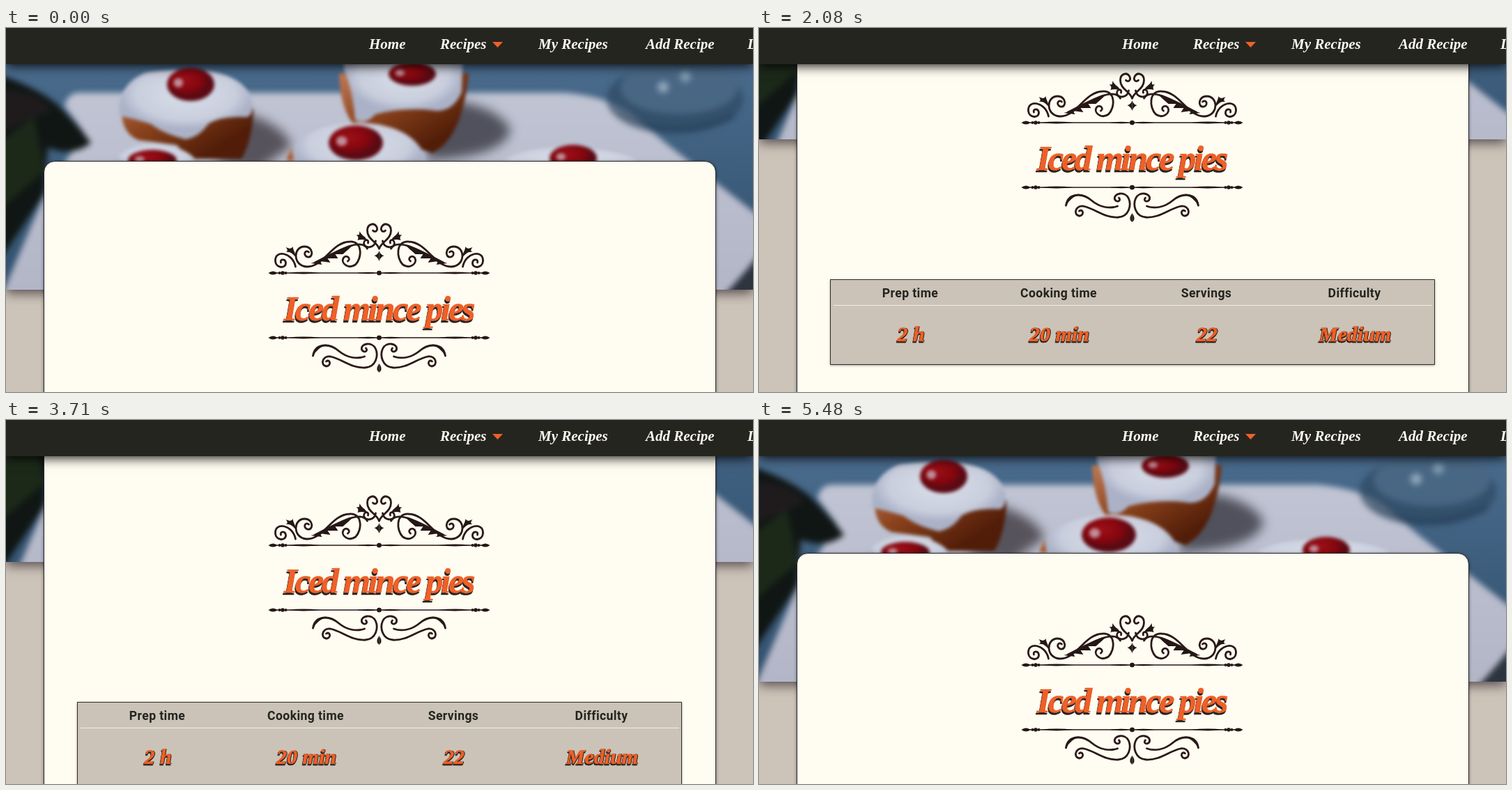
Recreate the animation shown at these times as an HTML page. Size 1072x523 px, loop 6330 ms.

```html
<!DOCTYPE html>
<html lang="en">
<head>
<meta charset="utf-8">
<title>Iced mince pies</title>
<style>
html, body { margin: 0; width: 100%; height: 100%; overflow: hidden; background: #cdc4b9; }
svg { position: absolute; left: 0; top: 0; display: block; overflow: visible; }
#stage { position: relative; width: 1072px; height: 523px; overflow: hidden; background: #cdc4b9; }
#page { position: absolute; left: 0; top: 0; width: 1072px; height: 1000px; }
#hero { position: absolute; width: 1072px; height: 376px; box-shadow: 0 5px 16px rgba(45, 34, 40, .75); }
#clip { position: absolute; width: 100%; height: 100%; overflow: hidden; background: #40607f; }
#card { position: absolute; left: 54px; top: 191px; width: 963px; height: 900px; border: 1px solid #292823;
  border-radius: 16px; background: #fffcf1; box-shadow: 0 1px 4px rgba(0, 0, 0, .5); }
#facts { position: absolute; left: 102px; top: 577px; width: 866px; height: 121px; border: 1px solid #302f2a;
  background: #cbc3b7; box-shadow: 0 1px 3px rgba(0, 0, 0, .35); }
#facts::after { content: ""; position: absolute; left: 4px; right: 3px; top: 36px; height: 1px; background: #f2eee3; }
#nav { position: absolute; width: 1072px; height: 52px; background: #252520; box-shadow: 0 2px 16px rgba(0, 0, 0, .95); }
.script { font: italic 700 21px "Liberation Serif", serif; fill: #fffcf1; }
.script.title { font-size: 50px; letter-spacing: -3.2px; }
.script.value { font-size: 30px; }
.title, .value { fill: #ee6028; stroke: #ee6028; stroke-width: .7px; text-anchor: middle; }
.title { filter: drop-shadow(-1px 3px 0 #25221f); }
.value { filter: drop-shadow(1px 0 0 #25221f) drop-shadow(-1px 2px 0 #25221f); }
.label { font: 700 17.6px Roboto, sans-serif; letter-spacing: .4px; fill: #242420; text-anchor: middle; }
.line { fill: none; stroke: #2a1a18; stroke-width: 2.8; stroke-linecap: round; }
.solid { fill: #241715; }
</style>
</head>
<body>
<div id="stage">
  <div id="page">
    <div id="hero"><div id="clip">
      <svg id="photo" width="1072" height="460">
        <defs>
          <linearGradient id="sky" x2="0" y2="1">
            <stop offset=".1" stop-color="#4c6e90"/><stop offset=".5" stop-color="#3c5c7b"/><stop offset="1" stop-color="#2c4964"/>
          </linearGradient>
          <linearGradient id="cloth" x2="0" y2="1">
            <stop stop-color="#c0c4d3"/><stop offset="1" stop-color="#aeb1c3"/>
          </linearGradient>
          <linearGradient id="cake" x2=".8" y2=".8">
            <stop stop-color="#c17a55"/><stop offset=".5" stop-color="#8a421c"/><stop offset="1" stop-color="#511d08"/>
          </linearGradient>
          <radialGradient id="ice" cy=".35">
            <stop stop-color="#d9deea"/><stop offset=".75" stop-color="#c9cedd"/><stop offset="1" stop-color="#abb2c7"/>
          </radialGradient>
          <radialGradient id="red" cx=".4" cy=".35">
            <stop stop-color="#9c0f18"/><stop offset=".65" stop-color="#85060e"/><stop offset="1" stop-color="#5a0a14"/>
          </radialGradient>
        </defs>
        <rect x="-30" y="-30" width="1132" height="520" fill="url(#sky)"/>
        <g style="filter:blur(4px)">
          <path d="M104 93H800Q866 98 900 126L950 168L1090 278V480H-30V440L55 240L112 150L84 112Q88 94 104 93Z" fill="url(#cloth)"/>
          <path d="M1090 312Q1066 346 1030 384H1090Z" fill="#2c343e"/>
          <path d="M-20 64Q40 82 74 110Q104 140 122 165Q96 186 60 172L54 240L-20 350Z" fill="#101614"/>
          <path d="M-10 165L40 128L56 205L-10 262Z" fill="#1c2919"/>
          <path d="M-10 88Q45 90 66 118L-10 150Z" fill="#1f1b1d"/>
          <g opacity=".65">
            <ellipse cx="960" cy="102" rx="98" ry="50" fill="#2b465f"/>
            <ellipse cx="966" cy="86" rx="84" ry="38" fill="#4a6782"/>
            <path d="M880 122Q950 168 1045 126" fill="none" stroke="#1c344b" stroke-width="7"/>
            <circle cx="943" cy="85" r="8" fill="#b9cad8"/><circle cx="975" cy="70" r="8" fill="#9db5c8"/>
          </g>
        </g>
        <g style="filter:blur(8px)">
          <path d="M335 120Q400 138 410 170L360 205L300 190Z" fill="#57535c"/>
          <path d="M640 104Q708 114 724 146Q716 186 600 190Z" fill="#50515c"/>
        </g>
        <g id="cakes" style="filter:blur(2.5px)">
          <path d="M166 124Q168 152 190 161L245 168L262 188H338Q354 160 355 116L260 70Z" fill="url(#cake)"/>
          <path d="M163 126Q158 82 200 64Q320 48 348 92Q360 122 346 128Q308 126 290 138Q278 156 258 160Q226 152 208 138Q190 132 163 126Z" fill="url(#ice)"/>
          <path d="M478 65Q480 120 502 142L528 150L612 180Q655 158 664 65Z" fill="url(#cake)"/>
          <path d="M485 60Q498 90 501 132Q516 140 530 124Q570 114 610 118Q640 124 654 92L656 30H485Z" fill="url(#ice)"/>
          <path d="M402 190L410 172Q430 176 440 195Z" fill="#a85a31"/>
          <path d="M410 176Q430 138 505 136Q582 138 602 185L590 225H420Z" fill="url(#ice)"/>
          <path d="M150 210Q154 168 215 166Q275 172 282 210Z" fill="url(#ice)"/>
          <path d="M690 210Q724 168 812 172Q910 176 930 210Z" fill="url(#ice)"/>
        </g>
      </svg>
    </div></div>
    <div id="card"></div>
    <div id="facts"></div>
    <svg id="art" width="1072" height="800">
      <defs>
        <g id="rule">
          <path class="line" d="M0 0H150" style="stroke-width:1.5"/>
          <path class="solid" d="M4 0Q14 -2.5 32 0Q14 2.5 4 0ZM84 0Q110 -2.8 131 0Q110 2.8 84 0ZM146 0Q152 -5 159 0Q152 5 146 0Z"/>
          <circle class="solid" r="3.2"/><circle class="solid" cx="134" r="2"/>
          <circle class="solid" cx="138.5" r="2.8"/><circle class="solid" cx="143" r="2"/>
        </g>
        <g id="half">
          <use href="#rule" y="352"/>
          <use href="#rule" y="445"/>
          <g class="line">
            <path d="M0 317C4 306 17 304 17 291C17 282 8 279 4 285C1 290 5 295 9 291"/>
            <path d="M5 306C7 317 20 317 22 310C22 303 14 303 16 309"/>
            <path d="M101 322C106 318 110 326 103 329C94 331 94 314 107 314C124 314 124 342 104 343C80 344 68 307 42 307C24 306 24 330 34 340C44 347 56 338 51 330C46 325 40 332 45 335"/>
            <path d="M17 317C26 302 52 316 92 337"/>
            <path d="M120 343C124 322 150 318 149 335C148 346 133 346 134 337C135 331 143 332 141 337"/>
            <path d="M95 471C92 453 72 452 58 464C46 474 32 476 21 472"/>
            <path d="M76 479C71 475 68 484 75 486C85 486 82 470 70 472C52 476 40 489 20 488C4 487 1 470 5 461C10 450 27 453 25 462C22 468 15 464 19 460"/>
          </g>
          <g class="solid">
            <path d="M17 306C20 298 24 300 28 292C29 296 27 298 33 297C29 300 30 302 31 305C25 303 21 304 17 306Z"/>
            <path d="M36 311C60 316 70 330 98 338L82 340L85 335L70 337L74 331L59 331L63 325L52 325C45 319 41 315 36 311Z"/>
            <path d="M120 329C120 322 123 321 124 314C126 317 127 318 134 315C131 319 131 320 134 322C127 321 124 325 120 329Z"/>
            <path d="M0 320Q2 326 7 327Q2 329 0 335Z"/>
            <path d="M0 482Q5 489 2 493L0 495Z"/>
            <path d="M95 472Q90 453 74 455Q89 459 95 472Z"/>
          </g>
        </g>
      </defs>
      <use href="#half" transform="translate(535.5)"/>
      <use href="#half" transform="translate(535.5) scale(-1 1)"/>
      <text class="script title" x="534.5" y="420">Iced mince pies</text>
    </svg>
  </div>
  <div id="nav">
    <svg id="menu" width="1072" height="52"><path d="M698 20H713L705.5 28Z" fill="#ee6028"/></svg>
  </div>
  <svg id="cursor" width="12" height="20">
    <path d="M.5 .5V13.5L3.6 10.8L5.7 15.6L7.8 14.7L5.8 10H9.7Z" fill="#fff" stroke="#222"/>
  </svg>
</div>
<script>
const LOOP = 6330, LEAD = 4;
const $ = id => document.getElementById(id);

function add(parent, tag, attrs, text = "") {
  const el = document.createElementNS("http://www.w3.org/2000/svg", tag);
  for (const k in attrs) el.setAttribute(k, attrs[k]);
  el.textContent = text;
  parent.append(el);
}

[["Home", 521], ["Recipes", 623], ["My Recipes", 764], ["Add Recipe", 918], ["Login", 1064]]
  .forEach(([name, x]) => add($("menu"), "text", { class: "script", x, y: 30 }, name));

[["Prep time", "2 h", 217], ["Cooking time", "20 min", 430], ["Servings", "22", 642], ["Difficulty", "Medium", 854.5]]
  .forEach(([name, value, x]) => {
    add($("art"), "text", { class: "label", x, y: 603 }, name);
    add($("art"), "text", { class: "script value", x: x + 1, y: 666 }, value);
  });

// cherries: centre and radii, each with a soft highlight
[[265, 81, 34, 24], [583, 66, 34, 17], [502, 165, 39, 25], [210, 190, 35, 15], [814, 187, 34, 19]]
  .forEach(([cx, cy, rx, ry]) => {
    add($("cakes"), "ellipse", { cx, cy, rx, ry, fill: "url(#red)" });
    add($("cakes"), "ellipse", { cx: cx - rx * .52, cy: cy - ry * .1, rx: rx * .2, ry: ry * .28, fill: "#c08d98" });
  });

// scroll runs: first step, last step, offsets spread evenly between them
const runs = [
  [740, 1310, [4, 19, 49, 98, 148, 187, 209, 218]],
  [1390, 1620, [221, 223, 224, 225]],
  [2080, 2470, [216, 166, 96, 40, 10, 0]],
  [3000, 3310, [8, 42, 102, 165, 206]],
  [3400, 3560, [221, 225, 216]],
  [3640, 4020, [172, 110, 58, 24, 7, 0]],
  [4500, 5070, [6, 26, 66, 116, 165, 200, 214, 203]],
  [5160, 5480, [162, 102, 48, 13, 0]]
];
const scroll = [[0, 0]];
for (const [from, to, ys] of runs)
  ys.forEach((y, i) => scroll.push([from + (to - from) * i / (ys.length - 1), y]));

const pointer = [
  [0, 1026, 481, 0], [280, 1026, 481, 1], [360, 1019, 452, 1],
  [440, 1015, 430, 1], [740, 1013, 434, 1], [1310, 1013, 434, 0]
];

function play(el, rows, pose) {
  const frames = rows.map(([t, ...v]) => ({
    offset: Math.max(0, t - LEAD) / LOOP, easing: "step-end", ...pose(...v)
  }));
  frames.push({ ...frames[frames.length - 1], offset: 1 });
  return el.animate(frames, { duration: LOOP, iterations: Infinity });
}

const shift = (x, y) => `translate(${x}px, ${y}px)`;
const all = [
  play($("page"), scroll, y => ({ transform: shift(0, -y) })),
  play($("photo"), scroll, y => ({ transform: shift(0, y / 3) })),
  play($("cursor"), pointer, (x, y, on) => ({ transform: shift(x, y), opacity: on }))
];
const start = document.timeline.currentTime || 0;
all.forEach(a => a.startTime = start);
</script>
</body>
</html>
```
